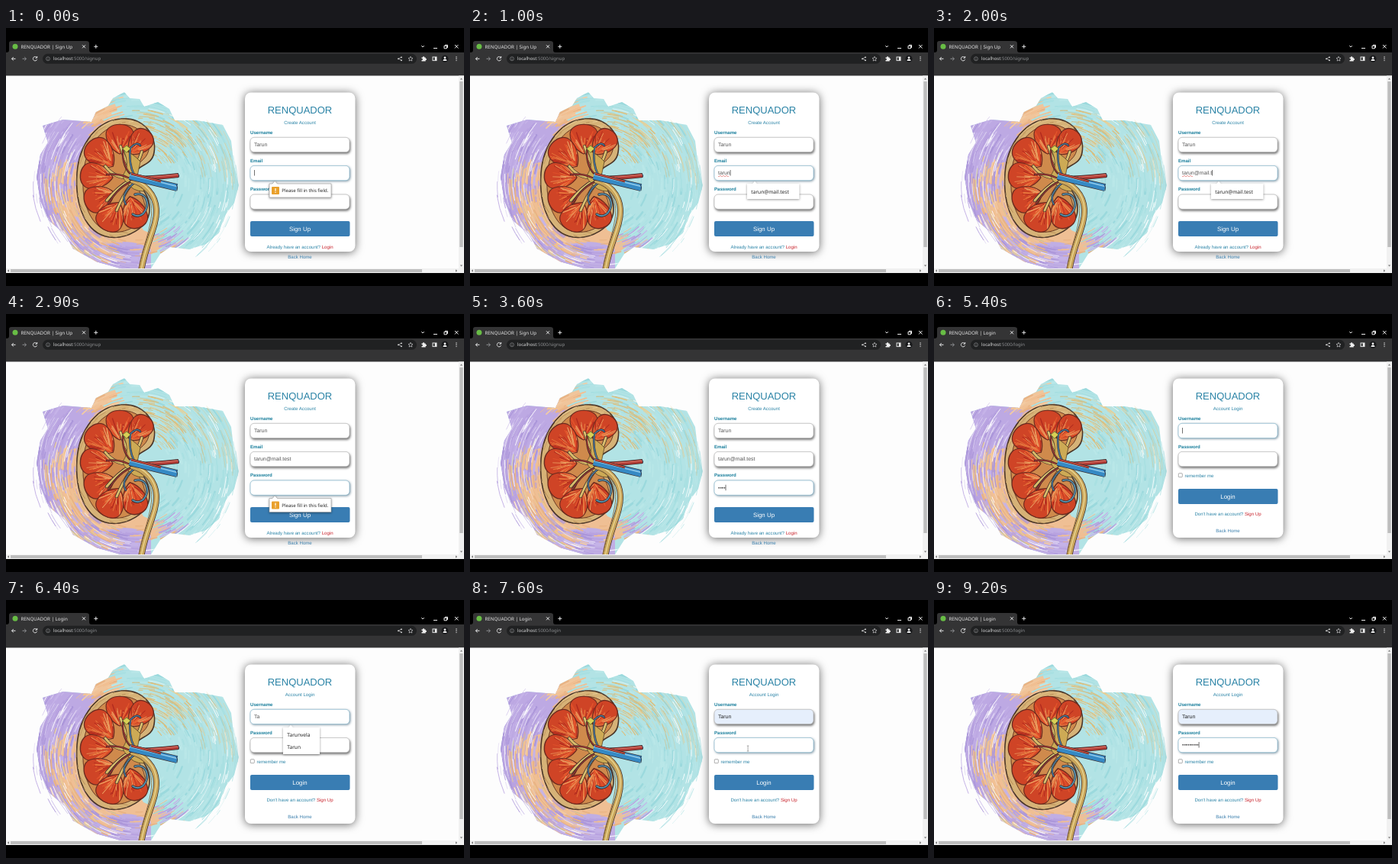
Recreate the animation shown at these times as an HTML page with a canvas. Size 600 px wide and 338 px high, loop 9.3 s.

```html
<!DOCTYPE html>
<html lang="en">
<head>
<meta charset="utf-8">
<title>Sign up and log in</title>
<style>
html, body { margin: 0; width: 100%; height: 100%; overflow: hidden; background: #000; }
canvas, svg { position: absolute; left: 0; top: 0; width: 600px; height: 338px; }
text { font-family: "Liberation Sans", Arial, sans-serif; font-size: 6.1px; fill: #2a83a6; white-space: pre; text-rendering: geometricPrecision; }
.ui { font-family: "Noto Sans", sans-serif; font-size: 6.05px; fill: #222; }
.mid { text-anchor: middle; }
.bold { font-weight: bold; fill: #177d9b; }
.title { font-size: 13px; }
.value { font-size: 6.9px; fill: #555; }
.button { font-size: 7.9px; fill: #fff; }
.back { fill: #3b7fad; }
.red { fill: #c8232c; }
.card { fill: #fff; filter: drop-shadow(0 1px 6px rgba(0,0,0,.6)); }
.field { fill: #fff; stroke: #b4b4b4; stroke-width: .7; filter: drop-shadow(1px 2px 1.5px rgba(0,0,0,.55)); }
.field.focus { stroke: #86b6cc; filter: drop-shadow(1px 1.5px 1.5px rgba(30,70,95,.55)); }
.field.filled { fill: #e6effc; }
.bubble { fill: #fff; filter: drop-shadow(0 1px 1.5px rgba(0,0,0,.4)); }
.icon { fill: none; stroke: #e4e5e6; stroke-width: 1; }
</style>
</head>
<body>
<canvas id="art" width="600" height="338"></canvas>
<svg viewBox="0 0 600 338">
  <!-- browser window -->
  <path fill="#343435" d="M1 32Q4 32 4 29V20Q4 17 7 17H105Q109 17 109 20V29Q109 32 112 32H600V62.500H0V32Z"/>
  <circle id="favicon" cx="12" cy="24.300" r="3.500" fill="#68bd45"/>
  <text id="tab" class="ui" style="font-size:6.200px;fill:#e6e6e6" x="19.500" y="26.600"></text>
  <rect x="48" y="33.800" width="490" height="13" rx="6.500" fill="#202122"/>
  <text class="ui" style="font-size:6px;fill:#d9dadb" x="62" y="42.400">localhost<tspan id="path" fill="#8d8f91"></tspan></text>
  <g class="icon">
    <path d="M100 22.300l4 4m0-4l-4 4M115.300 24.300h5m-2.500-2.500v5"/>
    <path d="M12.500 40.300h-5m2.300-2.300l-2.300 2.300 2.300 2.300"/>
    <path d="M21.500 40.300h5m-2.300-2.300l2.300 2.300-2.300 2.300" stroke="#8b8c8f"/>
    <path id="reload" d="M40.400 38.800a2.700 2.700 0 1 0 .2 2.500M40.700 37v2.200h-2.200"/>
    <path id="stop" d="M35.700 38l4.600 4.600m0-4.600l-4.600 4.600"/>
    <path d="M544.300 23.200l1.700 1.800 1.700-1.800M560 26.500h5M575 22.300h3.500v3.500M574 23.300h3.500v3.500H574zM588 22l4.500 4.500m0-4.500l-4.500 4.500" stroke="#eee"/>
    <path d="M514.300 40.300l3.500-2m-3.500 2l3.500 2" stroke-width=".6"/>
    <path d="M530 37.300l.9 2 2.100.2-1.600 1.500.5 2.100-1.900-1.100-1.900 1.100.5-2.100-1.600-1.500 2.100-.2z" stroke-width=".6"/>
    <rect x="559" y="38" width="5" height="4.600"/>
    <circle cx="55" cy="40.300" r="2.500" stroke="#96989b" stroke-width=".6"/>
    <path d="M55 39.800v2m0-3v.4" stroke="#96989b" stroke-width=".6"/>
  </g>
  <circle cx="575" cy="40.300" r="4.500" fill="#18191b"/>
  <g fill="#f0f0f0">
    <circle cx="514" cy="40.300" r=".9"/><circle cx="518" cy="38.300" r=".9"/><circle cx="518" cy="42.300" r=".9"/>
    <path d="M544.500 38.500h1.600a1 1 0 1 1 1.900 0h1.700v1.600a1 1 0 1 1 0 1.900v1.400h-5.200v-1.500a1 1 0 1 0 0-1.800z"/>
    <rect x="561.800" y="38" width="2.200" height="4.600"/>
    <circle cx="575" cy="39" r="1.400"/><path d="M572.400 43q0-2.200 2.600-2.200t2.600 2.200z"/>
    <circle cx="590" cy="38" r=".7"/><circle cx="590" cy="40.300" r=".7"/><circle cx="590" cy="42.600" r=".7"/>
  </g>
  <path fill="#f1f1f1" d="M593 62.500h7V321H0v-6h593z"/>
  <path fill="#bdbdbd" d="M6 316h539v4H6zM594.300 70h4.400v217h-4.400z"/>
  <path fill="#777" d="M4 316.300v3.400L1.800 318zM589 316.300v3.400l2.200-1.700zM594.800 67.500h3.400l-1.700-2zM594.800 310.500h3.400l-1.700 2z"/>

  <!-- form -->
  <rect class="card" x="313" y="84.500" width="144.500" height="208.500" rx="8"/>
  <text class="title mid" x="385" y="112.200">RENQUADOR</text>
  <text id="subtitle" class="mid" x="385" y="126"></text>
  <text class="bold" x="320" y="138.800">Username</text>
  <rect id="box0" class="field" x="320" y="143.300" width="130" height="19.300" rx="5"/>
  <text id="value0" class="value" x="325" y="155.300"></text>
  <text id="label1" class="bold" x="320" y="175.600"></text>
  <rect id="box1" class="field" x="320" y="180.400" width="130" height="19.300" rx="5"/>
  <text id="value1" class="value" x="325" y="192.300"></text>
  <path id="typo" d="M325 194q1 1.500 2 0t2 0 2 0 2 0 2 0 2 0 2 0" fill="none" stroke="#e0524c" stroke-width=".6"/>
  <g id="signup">
    <text class="bold" x="320" y="213.300">Password</text>
    <rect id="box2" class="field" x="320" y="218" width="130" height="19.300" rx="5"/>
    <text id="value2" class="value" x="325" y="230"></text>
    <text class="mid" x="385" y="288.500">Already have an account? <tspan class="red">Login</tspan></text>
  </g>
  <g id="login">
    <rect x="320.300" y="208.700" width="5" height="5" rx=".8" fill="#fff" stroke="#777" stroke-width=".6"/>
    <text x="328.500" y="213.500">remember me</text>
    <text class="mid" x="385" y="264.300">Don't have an account? <tspan class="red">Sign Up</tspan></text>
    <path id="ibeam" d="M362.800 191h2.600m-1.300 0v7m-1.300 0h2.600" fill="none" stroke="#777" stroke-width=".6"/>
  </g>
  <rect id="button" x="320" width="130.500" height="20" rx="2" fill="#397db3"/>
  <text id="action" class="button mid" x="385"></text>
  <text id="back" class="back mid" x="385">Back Home</text>
  <rect id="caret" width=".7" height="7.500" fill="#333"/>

  <!-- floating hints -->
  <g id="warning">
    <path class="bubble" stroke="#999" stroke-width=".6" d="M345 204h4l3.200-3.500 3.200 3.500H426v18H345z"/>
    <rect x="348" y="208" width="10" height="10" rx="1" fill="#e9a02c"/>
    <path d="M353 210v3.700m0 1v1.300" stroke="#fff" stroke-width="1.200"/>
    <text class="ui" x="361.300" y="215">Please fill in this field.</text>
  </g>
  <g id="mailHint">
    <path class="bubble" d="M363 204h7l3-3 3 3h55.500v20H363z"/>
    <text class="ui" style="font-size:6.600px" x="368.300" y="216.500">tarun@mail.test</text>
  </g>
  <g id="userHint">
    <path class="bubble" d="M363 167h7l3-3 3 3h35v35h-48z"/>
    <text class="ui" style="font-size:6.600px" x="368.300" y="179">Tarunvela</text>
    <text class="ui" style="font-size:6.600px" x="368.300" y="195">Tarun</text>
  </g>
</svg>
<script>
const $ = id => document.getElementById(id);
const g = $('art').getContext('2d');

/* ---------- illustration ---------- */
let seed = 11;
const rnd = (a = 0, b = 1) => a + (b - a) * ((seed = (seed * 16807) % 2147483647) / 2147483647);
const rad = d => d * Math.PI / 180;

function shape(d, fill, line, width = 1) {
  const p = new Path2D(d);
  if (fill) { g.fillStyle = fill; g.fill(p); }
  if (line) { g.strokeStyle = line; g.lineWidth = width; g.stroke(p); }
  return p;
}

// Dry-brush arcs swirling around one centre
function swirl(colors, n, a0, a1, r0, r1, maxWidth, cx = 172, cy = 204) {
  for (let i = 0; i < n; i++) {
    const a = rnd(a0, a1), span = rnd(3, 16);
    g.strokeStyle = colors[Math.floor(rnd(0, colors.length))];
    g.lineWidth = rnd(.3, maxWidth);
    g.beginPath();
    g.arc(cx + rnd(-5, 5), cy + rnd(-5, 5), rnd(r0, r1), rad(a - span / 2), rad(a + span / 2));
    g.stroke();
  }
}

function tube(d, color, width, shine) {
  shape(d, null, '#3a2b2b', width + 1.4);
  shape(d, null, color, width);
  g.save();
  g.translate(0, -width / 5);
  shape(d, null, shine, width / 5);
  g.restore();
}

// A fan-shaped lobe whose tip points along the given angle
function lobe(x, y, w, h, angle) {
  g.save();
  g.translate(x, y);
  g.rotate(rad(angle));
  g.scale(w, h);
  const p = shape('M0 1C-.5 .8-1 .3-1-.3C-1-1.150 1-1.150 1-.3C1 .3 .5 .8 0 1Z', '#cf4426');
  g.save();
  g.clip(p);
  for (let i = 0; i < 44; i++) {
    g.strokeStyle = ['#e8753a', '#b02a1e', '#e5552c', '#eca061'][i % 4];
    g.lineWidth = rnd(.03, .08);
    const a = rnd(-1.1, 1.1), from = rnd(0, .7);
    g.beginPath();
    g.moveTo(a * from * .7, 1 - from);
    g.lineTo(a, 1 - from - rnd(.4, .9));
    g.stroke();
  }
  g.restore();
  g.strokeStyle = '#6b2a1f';
  g.lineWidth = 1.1 / w;
  g.stroke(p);
  g.restore();
}

const purple = ['#b8a2e0', '#c5b3e8', '#ac97da'], peach = ['#f1bf92', '#e9b384', '#f3cba2'];
const cyan = ['#a9e0e2', '#b9e7e8', '#9bd9dd'], gold = ['#dfbd78', '#e9cf95', '#c9c496'];

function drawSplash() {
  const splash = new Path2D('M48 128L75 120 112 123 118 110 134 102 140 92 155 84 162 92 175 93 181 103 199 97 214 106 221 121 250 121 284 127 295 148 299 182 305 206 299 229 285 248 279 268 262 283 240 290 215 287 202 296 190 315H150L118 306 88 289 77 270 56 252 45 226 40 195 45 166 55 150Z');
  g.save();
  g.clip(splash);
  shape('M30 80H310V320H30Z', '#b2e3e5');
  shape('M30 110H130L150 320H30Z', '#bda9e3');
  shape('M100 125L120 95 142 96 150 125Z', '#f0c59b');
  shape('M60 195Q85 165 130 180L180 265 215 280 185 300 100 285Q66 250 60 195', '#efbf94');
  shape('M112 290Q160 270 190 290V320H100Z', '#c0aee4');
  swirl(purple, 200, 160, 222, 72, 140, 3);
  swirl(purple, 150, 90, 150, 80, 130, 2.500);
  swirl(peach, 200, 105, 195, 50, 118, 2.500);
  swirl(peach, 40, 232, 255, 85, 112, 2.500);
  swirl(cyan, 320, -112, 66, 45, 136, 3);
  swirl(peach, 25, 58, 92, 72, 100, 2);
  swirl(purple, 22, 48, 70, 72, 100, 2);
  swirl(gold, 120, 270, 325, 45, 100, 1.500);
  swirl(gold, 45, 300, 350, 80, 125, 1);
  swirl(gold, 40, 110, 200, 70, 120, 1.300);
  swirl(['#fff'], 70, -85, 65, 95, 140, 1);
  swirl(['#fff'], 110, 80, 222, 92, 145, 1);
  g.restore();
  swirl(cyan, 30, -20, 55, 118, 130, .9);
  swirl(gold, 16, -38, 2, 115, 133, .7);
  swirl(purple, 30, 145, 215, 122, 134, .9);
}

function drawKidney() {
  const shell = shape('M150 119C180 116 198 141 194 163C191 181 174 178 169 190C172 208 190 216 188 240C186 262 158 277 135 274C104 269 90 232 93 190C96 151 120 121 150 119Z', '#d6b277', '#4a3528', 1.600);
  g.save();
  g.clip(shell);
  swirl(['#e9d09b', '#b98e58', '#dfbd80'], 150, 90, 310, 60, 92, 1, 172, 196);
  g.restore();
  shape('M148 127C172 123 190 145 187 160C184 174 169 177 165 190C167 210 184 218 182 240C179 258 157 270 137 267C111 262 99 229 101 195C103 158 123 131 148 127Z', '#cf8a4c', '#6a3a25', 1);
  [[149, 145, 18, 20, 0], [175, 150, 15, 20, 42], [124, 165, 18, 23, -45], [118, 194, 17, 22, -85],
   [122, 223, 17, 21, -112], [138, 247, 18, 21, -150], [168, 242, 16, 22, 165]].forEach(l => lobe(...l));

  tube('M163 196Q143 198 130 181M163 199Q146 209 132 226M166 190Q155 172 150 155M166 190Q174 175 178 162M163 206Q153 220 145 239', '#d0b25f', 3, '#ecd995');
  shape('M154 160Q166 164 176 175L172 194Q184 206 180 214Q166 214 158 202Q150 196 156 188Q162 178 154 160Z', '#cdaa55', '#5a4426', .8);
  tube('M166 194Q152 183 153 160M160 196Q146 190 132 192M165 201Q148 207 134 230', '#b42b2a', 1, '#e0644c');
  tube('M168 193Q160 176 163 157Q172 148 176 154M168 203Q149 218 157 231', '#3b78a8', 1.200, '#7fb7d4');
  shape('M153 158l5-4 5 4-5 5z', '#d9cf55', '#507036', .8);
  tube('M166 200C181 204 196 217 197 238C198 260 183 282 177 319', '#c9a65c', 6.500, '#ecd793');
  shape('M173 206C188 214 193 231 190 250C186 275 178 290 174 315', null, '#8f6b39', .9);
  tube('M169 218C184 214 190 231 180 243Q173 249 166 244', '#46809f', 2, '#8fc0d2');
  g.lineCap = 'butt';
  tube('M163 197Q190 197 226 193', '#b03a34', 4.600, '#dd8272');
  tube('M162 194Q190 201 224 209', '#3589c4', 8.500, '#8dc8ea');
  tube('M164 191Q181 195 203 201', '#b8392e', 1.800, '#e2866c');
  g.lineCap = 'round';
  shape('M225.500 191q2 2 1 4M223 205q3 4 1 8', null, '#293d55', 1);
}

g.fillStyle = '#fdfdfd';
g.fillRect(0, 62, 600, 258);
g.beginPath();
g.rect(0, 63, 593, 252);
g.clip();
g.lineCap = g.lineJoin = 'round';
drawSplash();
drawKidney();

/* ---------- timeline (ms) ---------- */
const LOOP = 9300, SUBMIT = 4400, LOGIN = 5100, PICK = 6900;
const USER = 'Tarun', MAIL = 'tarun@mail.test';
const mailKeys = [400, 500, 600, 900, 1000, 1200, 1400, 1500, 1800, 1800, 1900, 2000];
const passKeys = [3200, 3300, 3500, 3600, 3700, 3800, 4000, 4100, 4200];
const userKeys = [5600, 5800];
const loginKeys = [7900, 8000, 8100, 8300, 8400, 8500, 8600, 8700, 8800];

const typed = (keys, t) => keys.filter(k => k <= t).length;
const show = (id, on) => $(id).style.display = on ? '' : 'none';
const put = (id, s) => { if ($(id).textContent !== s) $(id).textContent = s; };
const within = (t, a, b) => t >= a && t < b;

function render(t) {
  const login = t >= LOGIN, loading = within(t, SUBMIT, LOGIN);
  put('tab', 'RENQUADOR | ' + (login ? 'Login' : 'Sign Up'));
  put('path', ':5000/' + (login ? 'login' : 'signup'));
  put('subtitle', login ? 'Account Login' : 'Create Account');
  put('label1', login ? 'Password' : 'Email');
  put('action', login ? 'Login' : 'Sign Up');
  $('button').setAttribute('y', login ? 229 : 253);
  $('action').setAttribute('y', login ? 241.800 : 265.800);
  $('back').setAttribute('y', login ? 286.300 : 301.800);
  show('signup', !login);
  show('login', login);
  show('favicon', !loading);
  show('reload', !loading);
  show('stop', loading);

  const mailPicked = t >= 2200, userPicked = t >= PICK;
  const bullets = keys => '•'.repeat(typed(keys, t));
  put('value0', login && !userPicked ? USER.slice(0, typed(userKeys, t)) : USER);
  put('value1', login ? bullets(loginKeys) : mailPicked ? MAIL : MAIL.slice(0, typed(mailKeys, t)));
  put('value2', bullets(passKeys));
  $('value0').style.fill = login && userPicked ? '#222' : '';

  const focus = login ? (t < 5400 ? -1 : t < 7300 ? 0 : 1) : t < 2300 ? 1 : 2;
  for (let i = 0; i < 3; i++) $('box' + i).classList.toggle('focus', i === focus);
  $('box0').classList.toggle('filled', login && userPicked);

  show('warning', t < 400 || within(t, 2700, 3200));
  $('warning').setAttribute('transform', `translate(0 ${t < 2300 ? 0 : 37.5})`);
  show('mailHint', within(t, 400, 2200));
  show('typo', within(t, 1000, 2200));
  show('userHint', within(t, 5600, PICK));
  show('ibeam', within(t, 7200, 7900));

  // The caret blinks, restarting at each key or focus change
  const marks = [0, ...mailKeys, 2300, ...passKeys, 5400, ...userKeys, PICK, ...loginKeys];
  const last = Math.max(...marks.filter(m => m <= t));
  show('caret', focus >= 0 && !within(t, PICK, 7900) && (t - last) % 1000 < 500);
  if (focus >= 0) {
    $('caret').setAttribute('x', 325 + $('value' + focus).getComputedTextLength());
    $('caret').setAttribute('y', [149, 186, 223.700][focus]);
  }
}

const start = performance.now();
function tick() {
  render(Math.floor((performance.now() - start) % LOOP / 100) * 100);
  requestAnimationFrame(tick);
}
tick();
</script>
</body>
</html>
```
